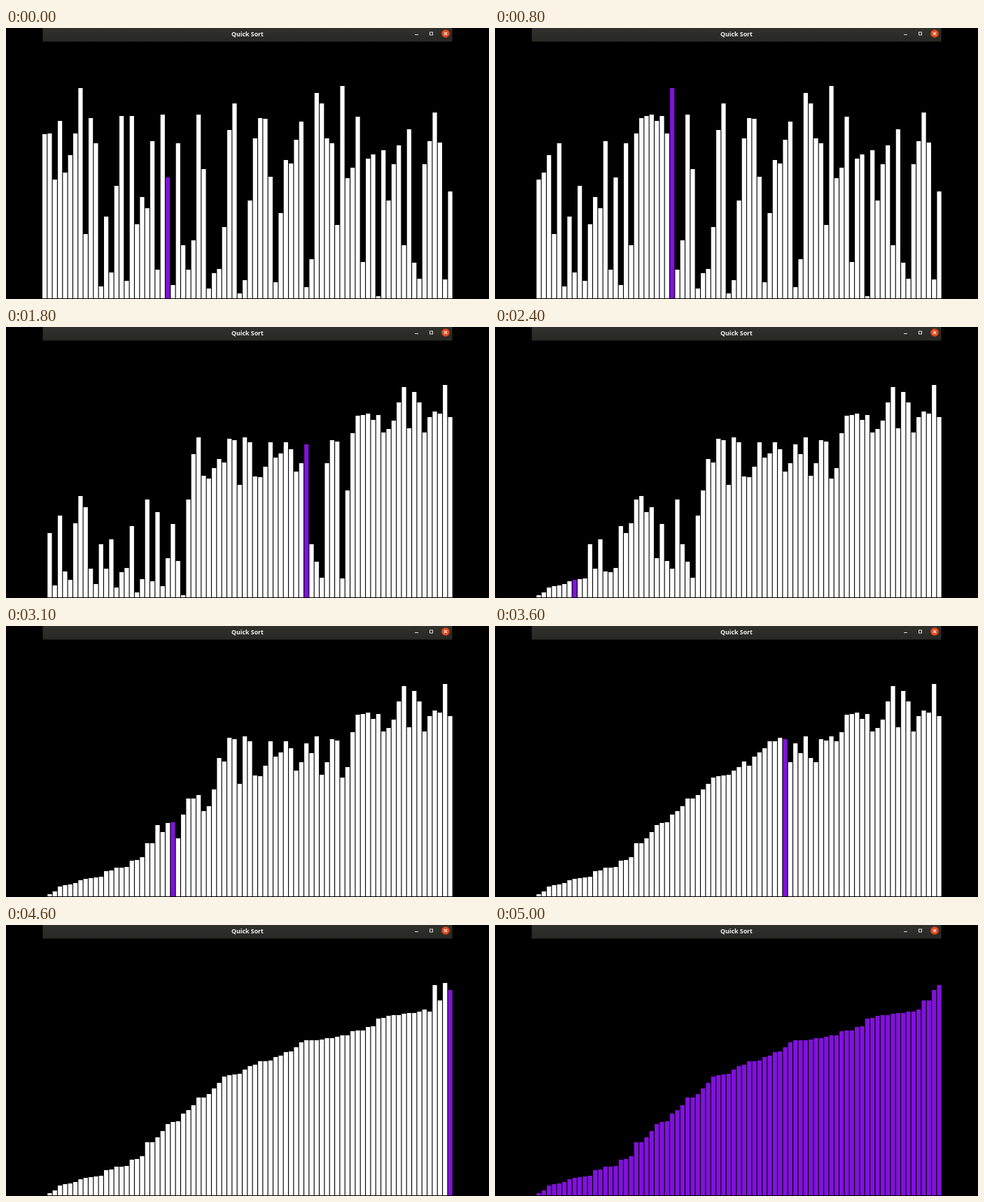
Recreate the animation shown at these times as an HTML page with a canvas. Size 690 by 388 pixels, loop 5.1 s.

```html
<!DOCTYPE html>
<html lang="en">
<head>
<meta charset="utf-8">
<title>Quick Sort</title>
<style>
  html, body { margin: 0; width: 100%; height: 100%; overflow: hidden; background: #000; }
  canvas { display: block; }
</style>
</head>
<body>
<canvas id="stage" width="690" height="388"></canvas>
<script>
const ctx = document.getElementById("stage").getContext("2d");
const LOOP = 5100, TICK = 100, DONE = 4700;
const LEFT = 52, PITCH = 7.335, BAR = 6.2, BASE = 387, VISIBLE = 80;
const PURPLE = "#8012d9";

// Bar tops in pixels; the last entry is an empty bar beyond the window edge.
const tops = [
  152, 151, 217, 133, 207, 182, 151, 86, 295, 129, 165, 370, 270, 350, 226, 126,
  362, 126, 281, 242, 258, 162, 346, 124, 214, 368, 165, 311, 346, 304, 124, 202,
  373, 351, 345, 285, 146, 108, 380, 361, 247, 158, 129, 130, 213, 364, 265, 189,
  194, 160, 134, 371, 331, 93, 108, 158, 165, 282, 83, 215, 200, 127, 335, 187,
  181, 384, 175, 247, 195, 168, 311, 145, 336, 359, 195, 162, 121, 164, 360, 234,
  BASE
];

// Time in ms and the number of comparisons made by then.
const pace = [
  [0, 25], [500, 74], [800, 107], [1200, 148], [1800, 210], [2400, 271],
  [3100, 341], [4100, 449], [4200, 464], [DONE, 515]
];

function recordSort(input) {
  const bars = input.map(top => BASE - top);
  const steps = [];
  const swap = (a, b) => { [bars[a], bars[b]] = [bars[b], bars[a]]; };

  function sort(low, high) {
    if (low >= high) return;
    const pivot = bars[high];
    let split = low;
    for (let j = low; j < high; j++) {
      if (bars[j] < pivot) swap(split++, j);
      steps.push({ bars: bars.slice(), cursor: j });
    }
    swap(split, high);
    sort(low, split - 1);
    sort(split + 1, high);
  }

  sort(0, bars.length - 1);
  return { steps, sorted: bars };
}

const { steps, sorted } = recordSort(tops);

function stepAt(time) {
  const k = pace.findIndex(([end]) => time < end);
  const [t0, s0] = pace[k - 1], [t1, s1] = pace[k];
  const count = Math.round(s0 + (s1 - s0) * (time - t0) / (t1 - t0));
  return steps[Math.min(count, steps.length) - 1];
}

function line(color, width, ...points) {
  ctx.strokeStyle = color;
  ctx.lineWidth = width;
  ctx.beginPath();
  for (const [x1, y1, x2, y2] of points) {
    ctx.moveTo(x1, y1);
    ctx.lineTo(x2, y2);
  }
  ctx.stroke();
}

function drawTitleBar() {
  const shade = ctx.createLinearGradient(0, 0, 0, 19);
  shade.addColorStop(0, "#30302c");
  shade.addColorStop(1, "#282824");
  ctx.fillStyle = shade;
  ctx.fillRect(52.5, 0, 585, 19.5);

  ctx.fillStyle = "#f2f2ee";
  ctx.font = "bold 8.8px 'Open Sans', 'Noto Sans', sans-serif";
  ctx.textAlign = "center";
  ctx.fillText("Quick Sort", 345, 11.6);

  line("#e4e4e0", 1, [584, 9.5, 589, 9.5]);
  ctx.strokeRect(605.5, 6, 4, 4);

  ctx.fillStyle = "#e2481c";
  ctx.beginPath();
  ctx.arc(628, 8, 5.8, 0, Math.PI * 2);
  ctx.fill();
  line("#fff", 1.1, [625.8, 5.8, 630.2, 10.2], [630.2, 5.8, 625.8, 10.2]);
}

function drawBars(bars, isMarked) {
  for (let i = 0; i < VISIBLE; i++) {
    ctx.fillStyle = isMarked(i) ? PURPLE : "#fff";
    ctx.fillRect(LEFT + i * PITCH, BASE - bars[i], BAR, bars[i]);
  }
}

function draw(time) {
  ctx.fillStyle = "#000";
  ctx.fillRect(0, 0, 690, 388);
  drawTitleBar();
  if (time >= DONE) {
    drawBars(sorted, () => true);
  } else {
    const { bars, cursor } = stepAt(time);
    drawBars(bars, i => i === cursor);
  }
}

function loop() {
  const time = performance.now() % LOOP;
  draw(Math.floor(time / TICK) * TICK);
  requestAnimationFrame(loop);
}
loop();
</script>
</body>
</html>
```
